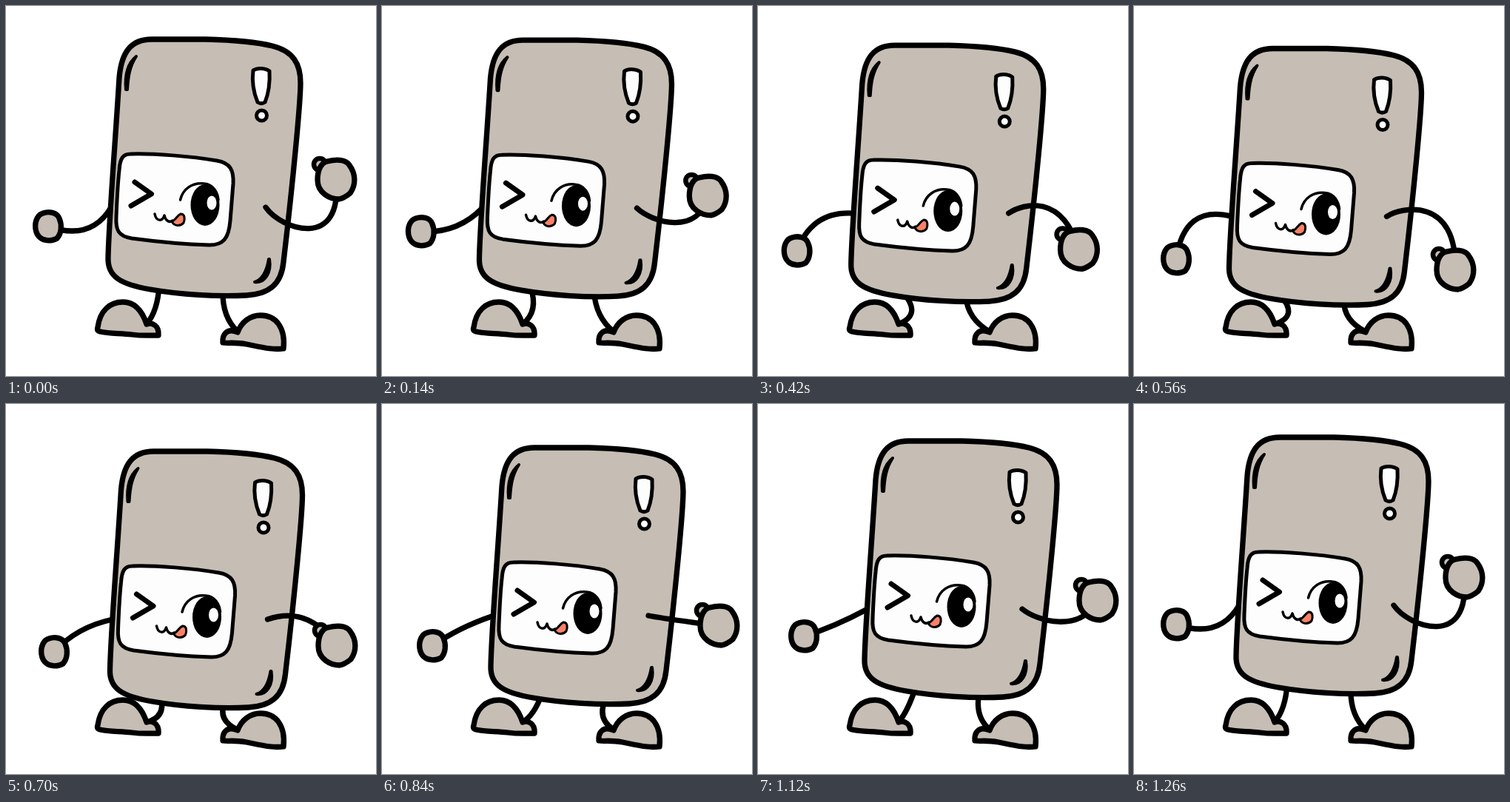
Animation of 500x500 px, one loop 1400 ms. Source, as an HTML page:

```html
<!DOCTYPE html>
<html lang="en">
<head>
<meta charset="utf-8">
<title>Waving box</title>
<style>
  html, body { margin: 0; width: 100%; height: 100%; overflow: hidden; background: #fff; }
  svg { display: block; width: 100%; height: 100%; }
  .skin { fill: #c6bdb4; }
  .line { fill: none; }
  .ink { fill: #000; }
  .white { fill: #fdfdfd; }
</style>
</head>
<body>
<svg viewBox="0 0 500 500" stroke="#000" stroke-width="7.3" stroke-linecap="round" stroke-linejoin="round">
  <path id="legL" class="line"/>
  <path id="legR" class="line"/>
  <path id="armL" class="line"/>

  <path class="skin" d="M124 434C127 412 140 400 158 400C176 400 185 415 190 430C198 427 207 432 206 445C190 445 185 446 170 444C155 442 140 443 127 440C123 439 123 437 124 434Z"/>
  <path class="skin" d="M313 441C318 427 330 418 344 418C365 418 378 435 375 463C360 465 345 461 325 457C310 454 300 456 293 455C292 445 298 434 313 441Z"/>

  <g id="body">
    <path class="skin" d="M197 45L270 45C310 46 340 49 360 54C388 61 398 78 398 104C398 130 388 235 375 346C372 376 356 389 325 391C285 393 235 390 195 383C155 376 137 366 138 340C139 290 148 180 153 97C156 62 169 45 197 45Z"/>
    <path class="ink" stroke-width="4" d="M176 68C166 76 160 90 162 113L164 113C165 95 167 82 176 68Z"/>
    <path class="ink" stroke-width="4" d="M356 342C359 360 350 375 336 373C345 370 352 360 355 342Z"/>
    <g class="white" stroke-width="5">
      <path d="M334 87C340 83 351 84 356 88C357 105 354 120 350 130C347 132 343 132 340 130C335 118 332 103 334 87Z"/>
      <circle cx="345.5" cy="148" r="7"/>
      <path d="M168 200C200 199 250 203 285 209C303 212 308 222 307 240L303 290C301 315 293 323 275 323C240 322 200 318 170 314C152 311 148 303 149 285C150 260 151 240 153 222C154 206 158 200 168 200Z"/>
    </g>
    <path class="line" stroke-width="7" d="M174 238L196.500 254L169 270"/>
    <path class="line" stroke-width="3.500" d="M201 281C203 291 211 292 214 283C216 291 221 293 225 290"/>
    <path fill="#f98267" stroke-width="3" d="M224 291C229 290 231 283 236 281C242 281 242 288 240 293C236 298 227 298 224 291Z"/>
    <path class="line" stroke-width="3.500" d="M235.500 262C239 247 252 238 268 240C280 241 286 252 287 262"/>
    <ellipse class="ink" stroke="none" cx="269" cy="269" rx="19.5" ry="28"/>
    <ellipse class="white" stroke="none" cx="278" cy="266" rx="6.5" ry="9.5"/>
  </g>

  <path id="armR" class="line"/>
  <path id="handL" class="skin" d="M-7 -18C1 -21 12 -19 15 -11C19 -2 18 9 12 16C5 20 -5 20 -11 15C-18 9 -19 -3 -15 -11C-13 -15 -11 -17 -7 -18Z"/>
  <g id="handR" class="skin">
    <circle cx="-22" cy="-21" r="8" stroke-width="6.5"/>
    <path d="M-12 -25C0 -28 13 -28 18 -20C27 -8 27 7 19 18C13 23 9 25 4 26C-8 26 -25 18 -25 0C-25 -14 -20 -23 -12 -25Z"/>
  </g>
</svg>
<script>
const STEP = 140, STEPS = 10, CYCLE = 9;

// key poses: step, body shift, left hand, right hand
const keys = [
  { at: 0, v: [0, 0, 57, 298, 446, 235] },
  { at: 2, v: [-12, 4, 50, 317, 436, 291] },
  { at: 4, v: [-9.5, 12.5, 57, 342, 434, 357] },
  { at: 5, v: [2.5, 19, 65, 335, 447, 327] },
  { at: 6, v: [9, 14, 68, 327, 455, 300] },
  { at: 8, v: [6, 5, 62, 314, 459, 266] }
];

const el = id => document.getElementById(id);
const move = (id, x, y) => el(id).setAttribute("transform", `translate(${x} ${y})`);
const path = (id, d) => el(id).setAttribute("d", d);

// smooth curve through the key poses
function valuesAt(step) {
  const n = keys.length;
  const i = keys.findLastIndex(k => k.at <= step);
  const [p, a, b, q] = [-1, 0, 1, 2].map(o => keys[(i + o + n) % n].v);
  const end = i + 1 < n ? keys[i + 1].at : CYCLE;
  const u = (step - keys[i].at) / (end - keys[i].at);
  return a.map((v, j) => v + u / 2 * (b[j] - p[j]
    + u * (2 * p[j] - 5 * v + 4 * b[j] - q[j]
    + u * (3 * (v - b[j]) + q[j] - p[j]))));
}

function pose([dx, dy, lx, ly, rx, ry]) {
  move("body", dx, dy);
  move("handL", lx, ly);
  move("handR", rx, ry);

  // a low hand lifts the elbow, a high hand lets it sag
  let x = 142 + dx, y = 272 + dy;
  const drop = ly - y;
  path("armL", `M${x} ${y}Q${lx + 97 - 1.5 * drop} ${y + 98 - 2 * drop} ${lx} ${ly}`);

  x = 351 + dx;
  const bend = 22 - (ry - y), sag = Math.max(-27, bend);
  path("armR", `M${x} ${y}C${x + 20} ${y + sag / 2} ${x + 45 + Math.abs(bend)} ${y + sag} ${rx} ${ry}`);

  // knees give way as the body sinks
  path("legL", `M${207 + dx} ${378 + dy}Q${205 - dx + 0.7 * dy} ${412 + 0.6 * dy} 190 430`);
  path("legR", `M${293 + dx} ${385 + dy}Q${292 + 0.4 * (dx - dy)} ${420 + 0.4 * dy} 313 440`);
}

let start;
function draw(now) {
  start ??= now;
  // the last step of the loop holds the first pose
  const step = Math.floor((now - start) / STEP) % STEPS;
  pose(valuesAt(step % CYCLE));
  requestAnimationFrame(draw);
}
pose(valuesAt(0));
requestAnimationFrame(draw);
</script>
</body>
</html>
```
